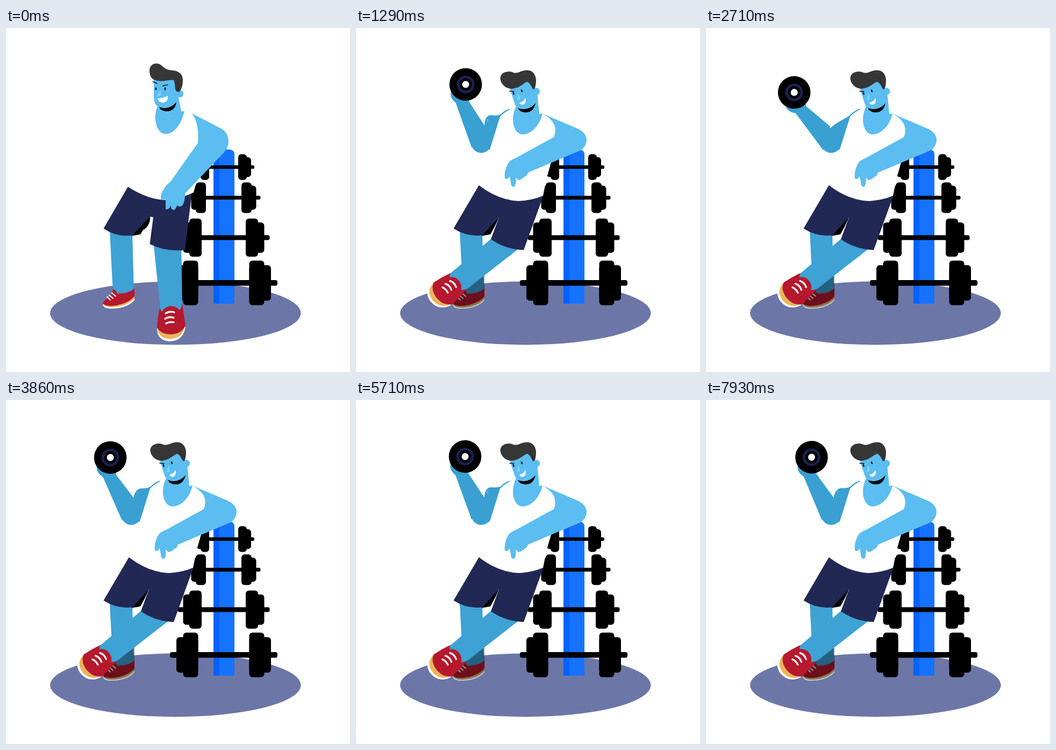
An HTML page that plays this animation: 640 by 640 pixels, repeating every 8 s.

```html
<!DOCTYPE html>
<html lang="en">
<head>
<meta charset="utf-8">
<title>Dumbbell curl</title>
<style>
  html, body { margin: 0; width: 100%; height: 100%; overflow: hidden; background: #fff; }
  svg { display: block; width: 100vw; height: 100vh; }
  .skin { fill: #5bbdf0; }
  .shade { fill: #3ea2d4; }
  .navy { fill: #212854; }
  .red { fill: #b6182d; }
  .sole { fill: #ebb45a; }
  .white { fill: #fff; }
  .lace { fill: none; stroke: #fff; stroke-linecap: round; }
  .brow { fill: none; stroke: #111; stroke-width: 1.5; stroke-linecap: round; }
</style>
</head>
<body>
<svg viewBox="0 0 640 640">
  <ellipse cx="315.3" cy="530.5" rx="233.2" ry="59" fill="#6c77a8"/>

  <path d="M386 226H415Q425 226 425 236V513H386Z" fill="#1673ff"/>
  <path d="M386 226H397V513H386Z" fill="#0062ff"/>
  <g id="rack"></g>

  <!-- standing leg -->
  <path class="shade" d="M193 378L199 493L238 491L235 382Z"/>
  <path class="white" d="M180 514Q181 523 200 522Q228 520 239 506V500Z"/>
  <path class="sole" d="M180 511Q181 520 198 519.500Q226 518 239 503V496Z"/>
  <path class="red" d="M199 486Q203 484 207 495Q230 494 239 484V499Q230 511 206 516Q188 519 180 513Q181 507 190 502Q199 496 199 486Z"/>
  <path class="lace" stroke-width="2" d="M188 500L194 506M192 497L199 503M197 493L204 499"/>
  <path id="shadow" d="M204 487L239 459V505Q229 518 205 521Q182 523 180 513Z" fill="#000" opacity="0"/>

  <path d="M233 387L268 350Q269 368 255 376L250 384Z" data-to="M233 387L266 351Q262 362 255 375L250 384Z"/>
  <path class="navy" d="M227 295L181.500 373Q206 390 235 385.500L268 351L300 318Z" data-to="M229 292L181.500 373Q206 389 235 385.500L266 352L300 320Z"/>

  <!-- crossing leg -->
  <g id="leg">
    <path class="shade" d="M274 396L288 530L328 524L326 393Z" data-to="M279 400L286.500 530L328 524L326 393Z"/>
    <path class="white" d="M281 558Q281 582 305 583Q330 582 334 556Z"/>
    <path class="sole" d="M281 552Q281 578 306 578.500Q330 577 334 550Z"/>
    <path class="red" d="M286 521Q288 527 291 527Q296 518 306 517.500Q317 517 323 525Q326 521 328 513Q330 528 334 553Q327 569 307 570Q288 570 281 557Q282 538 286 521Z"/>
    <path class="lace" stroke-width="3.200" d="M297 531Q304 526 313 529M296 541Q303 536 312 539M298 549.500Q304 546 312 547.500"/>
  </g>
  <path class="navy" d="M227 295Q262 320 294 320L346 305L333 413Q298 417 267.500 402L274 352L267 351Z" data-to="M229 292Q262 320 303 321L349 311L312 413Q278 412 251 393L266 352L262 350Z"/>

  <!-- curling arm -->
  <g id="curl" fill="#39a0d1">
    <path id="upper"/>
    <circle cx="233" cy="214" r="18.500"/>
    <g id="forearm">
      <path d="M184 135L215 222L236 216L240 183L209 135Z"/>
      <g id="wrist">
        <path d="M177 116Q173 130 186 139.500L206 140Q211 137 212 131L200 112Z"/>
        <circle cx="204" cy="105" r="30.300" fill="#000"/>
        <circle cx="204" cy="105" r="14" fill="none" stroke="#1b2150" stroke-width="5"/>
        <circle cx="204" cy="105" r="6.500" fill="#fff"/>
      </g>
    </g>
    <ellipse id="glint" class="skin" cx="244.500" cy="171.500" rx="1.500" ry="2.500"/>
  </g>

  <path class="white" d="M280 150C268 152 260 160 256 168L245 226L226 295Q264 319 294 320Q325 318 349 306L356 280L361 266L358 214Q360 178 346 159L332 155Z" data-to="M296 150C286 150 277 156 268 165L249 226L228 292Q264 320 303 322Q330 320 348 312L355 278L364 247L372 205Q381 176 346 159L338 157Z"/>
  <path class="skin" d="M280 150C274 172 281 197 297 197C314 197 326 178 332 155L326 155L320 125L290 130Z" data-to="M296 150C287 172 294 198 310 198C328 198 343 178 347 159L341 160L337 118L305 130Z"/>

  <g id="head">
    <path class="skin" d="M275 92V130Q276 150 297 150Q312 150 319 130L321 90Z"/>
    <circle class="skin" cx="323.500" cy="122.500" r="6.700"/>
    <path id="browL" class="brow" d="M273 100L281 103"/>
    <path id="browR" class="brow" d="M291.500 108Q296 105.500 301 106"/>
    <ellipse cx="279" cy="113" rx="1.400" ry="2.700"/>
    <ellipse cx="296" cy="113" rx="1.400" ry="2.700"/>
    <path d="M288 115L281 127H287Q289 122 288 115Z" fill="#82d5f8"/>
  </g>
  <path class="white" d="M281.500 131Q292 131 301 126Q302 138 292 139Q284 138.500 281.500 131Z" data-to="M304 139Q312 138 315 130Q318 141 309.500 143Q305 142.500 304 139Z"/>
  <path d="M285 147Q303 154 317 138Q314 154.500 300 155Q288 155 285 147Z" data-to="M301 149Q320 156 334 140Q330 157 316 157Q305 157 301 149Z"/>
  <path d="M267 82C266 71 273 66 279 66C291 66 291 76 306 78.500C322 79 329 86 329 97C329 110 324 119 321 119Q316 119 315 114Q314 100 312 97C302 96 294 100 285 98.500C273 98 268 92 267 82Z" data-to="M268.500 95C268 86 275 81 285 81C292 81 293 86 304 82C319 75 333 78 335 96C335 106 333 114 331 114Q329 114 327 110Q324 103 319 100C311 102 306 110 295 112C283 116 270 107 268.500 95Z" fill="#363636"/>
  <path d="M319.500 95L321 115" data-to="M323 92L330 111" stroke="#222" stroke-width=".8"/>

  <!-- resting arm -->
  <path class="skin" d="M346 159L402 188Q414 196 414 212Q414 222 406 231L333 308Q333 326 327 331Q322 334 319 330L314 338Q306 340 307 329Q304 339 297 337L297 318Q290 321 288 318Q287 305 300 291Q303 288 306 286L357 214Q360 178 346 159Z" data-to="M346 159L412 187Q429 195 429 209Q428 222 417 228L320 269Q318 276 313 277Q309 282 302 283L297 278Q299 288 295 295Q288 297 288 287L286 276Q282 283 277 280Q275 266 283 252Q286 246 297 242L368 203Q379 176 346 159Z"/>
</svg>
<script>
  const LOOP = 8000, FPS = 14, CURL_PERIOD = 2390;
  const $ = id => document.getElementById(id);
  const clamp = v => Math.min(1, Math.max(0, v));
  const mix = (a, b, k) => a + (b - a) * k;

  // Blends two paths that share the same commands.
  function mixPath(from, to, k) {
    const ends = to.match(/-?[\d.]+/g);
    let i = 0;
    return from.replace(/-?[\d.]+/g, n => mix(+n, +ends[i++], k).toFixed(2));
  }

  // Dumbbells: centre y, then half widths and half heights of grip, plates and bar.
  const RACK_X = 405;
  const block = (x, y, w, h, r) =>
    `<rect x="${x}" y="${y - h}" width="${w}" height="${2 * h}" rx="${r}"/>`;
  const dumbbell = ([y, grip, inner, outer, bar, tall, short, thick]) =>
    block(RACK_X - bar, y, 2 * bar, thick, thick * .7) +
    [-1, 1].map(side => {
      const plate = (end, h) =>
        block(side < 0 ? RACK_X - end : RACK_X + grip, y, end - grip, h, 6);
      return plate(inner, tall) + plate(outer, short);
    }).join('');
  $('rack').innerHTML = [
    [258.7, 27, 43, 51, 57, 24, 18.5, 3.2],
    [315.7, 33, 52, 60.5, 68.5, 28.5, 22.5, 3.5],
    [390, 41, 64, 75.5, 85.5, 35.5, 28.2, 4.5],
    [474.2, 47.5, 75.5, 88, 100, 41.5, 33, 5.3]
  ].map(dumbbell).join('');

  // Curl cycle as [ms, extension]: quick lift, short hold, even lowering.
  const curlKeys = [
    [0, 1.09], [90, 1], [190, .79], [330, .56], [550, .31], [770, .1], [940, .015],
    [1120, -.03], [1300, 0], [1500, .15], [1720, .41], [1910, .65], [2090, .83],
    [2300, 1], [CURL_PERIOD, 1.09]
  ];
  function curlAt(t) {
    const ms = (t + 10) % CURL_PERIOD;
    const i = curlKeys.findIndex(key => key[0] > ms);
    const [t0, v0] = curlKeys[i - 1], [t1, v1] = curlKeys[i];
    return mix(v0, v1, (ms - t0) / (t1 - t0));
  }

  const flexed = 'M249 226L233 231L221 206L239 182Q239 164 250 162Q266 164 270 160Q276 153 287 150L282 160L268 168Z';
  const extended = 'M249 226L233 231L221 206L230 187Q240 180 250 174Q262 167 268 162Q276 153 287 150L282 160L268 168Z';
  const morphs = [...document.querySelectorAll('[data-to]')]
    .map(el => ({ el, from: el.getAttribute('d'), to: el.dataset.to }));
  const move = (id, value) => $(id).setAttribute('transform', value);

  function pose(t) {
    const lean = 1 - (1 - clamp(t / 860)) ** 2;
    const curl = curlAt(t);

    for (const { el, from, to } of morphs) el.setAttribute('d', mixPath(from, to, lean));
    move('leg', `translate(${-23 * lean} ${-7 * lean}) rotate(${53 * lean} 301 405)`);
    move('head', `translate(${325 + 12 * lean} ${122 - 5 * lean}) rotate(${-18 * lean}) ` +
      `scale(${1 - .06 * lean} 1) translate(-325 -122)`);
    move('browL', `translate(0 ${7 * lean})`);
    move('browR', `translate(0 ${-4 * lean - 8 * clamp((t - 1300) / 500)})`);
    $('shadow').setAttribute('opacity', .4 * lean);

    $('curl').setAttribute('visibility', t < 140 ? 'hidden' : 'visible');
    $('upper').setAttribute('d', mixPath(flexed, extended, clamp(1.6 * curl)));
    move('forearm', `rotate(${-31 * curl} 233 215)`);
    move('wrist', `rotate(${-29 * curl} 195 135)`);
    $('glint').setAttribute('opacity', clamp(1 - 4 * curl));
  }

  const start = performance.now();
  function tick() {
    const t = (performance.now() - start) % LOOP;
    pose(Math.floor(t * FPS / 1000 + .1) * 1000 / FPS % LOOP);
    requestAnimationFrame(tick);
  }
  tick();
</script>
</body>
</html>
```
